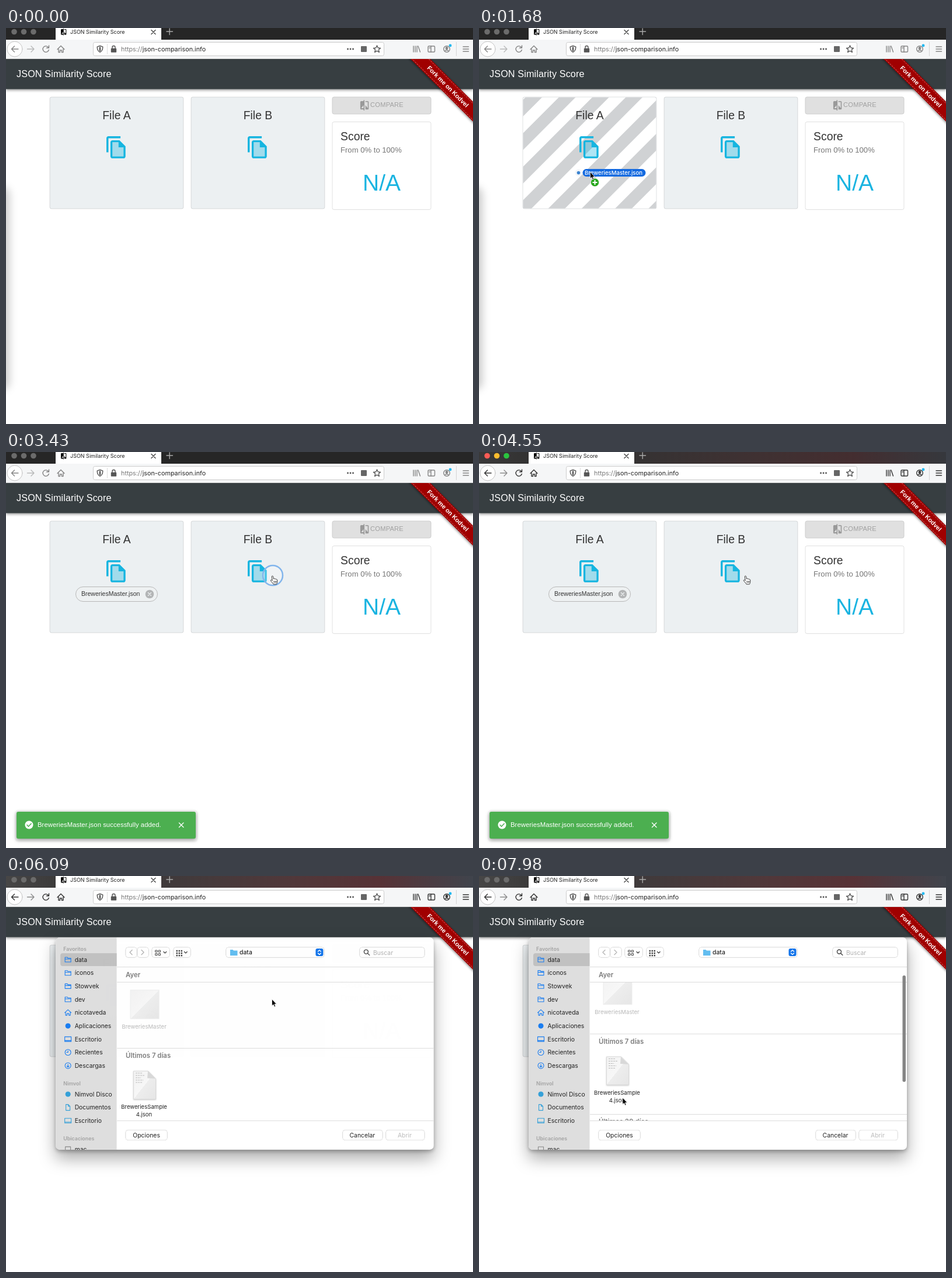
An HTML page that plays this animation: 800x677 px, repeating every 8 s.

```html
<!DOCTYPE html>
<html lang="en">
<head>
<meta charset="utf-8">
<title>JSON Similarity Score</title>
<style>
  html, body { margin: 0; height: 100%; overflow: hidden; background: #fff; }
  svg { display: block; width: 100vw; height: 100vh; }
  text { font-family: "Liberation Sans", Arial, sans-serif; fill: #333; }
  .ui text { font-family: Inter, sans-serif; font-size: 10.4px; fill: #222; }
  .mid { text-anchor: middle; }
  .line { fill: none; stroke: currentColor; stroke-width: 1.4; stroke-linecap: round; stroke-linejoin: round; }
  .side-icon { stroke-width: 1.1; }
  .solid { fill: currentColor; }
  .rule { stroke: #dcdcdc; fill: none; }
  .title { font-size: 19.4px; }
  .ui .group { font-size: 11.4px; font-weight: 600; fill: #7d7d7d; }
  .ui .side { font-size: 8.9px; font-weight: 600; fill: #a3a3a3; }
  .ui .file { font-size: 9.6px; text-anchor: middle; }
  .button { fill: #fff; stroke: #ececec; stroke-width: .8; filter: drop-shadow(0 .7px .6px #0006); }
  .card { stroke: #0000001f; }
  #dialog { filter: drop-shadow(0 3px 3px #0004) drop-shadow(0 14px 14px #0005); transform-origin: 409px 286px; }
  #snack { filter: drop-shadow(0 2px 3px #0006); transform-origin: 171px 638px; }
</style>
</head>
<body>
<svg viewBox="0 0 800 677" preserveAspectRatio="none">
  <defs>
    <linearGradient id="strip">
      <stop stop-color="#474646"/><stop offset=".12" stop-color="#3a3939"/>
      <stop offset=".35" stop-color="#403a3b"/><stop offset=".6" stop-color="#50383a"/>
      <stop offset=".8" stop-color="#573236"/><stop offset="1" stop-color="#40444c"/>
    </linearGradient>
    <linearGradient id="paper" x2="1" y2="1">
      <stop stop-color="#f2f2f2"/><stop offset=".5" stop-color="#f7f7f7"/><stop offset=".5" stop-color="#ededed"/><stop offset="1" stop-color="#e6e6e6"/>
    </linearGradient>
    <filter id="blur" x="-50%" width="200%"><feGaussianBlur stdDeviation="7"/></filter>
    <clipPath id="cardClip"><rect x="75.5" y="118.5" width="228" height="190" rx="3"/></clipPath>
    <clipPath id="sheetClip"><rect x="85" y="105" width="648" height="363" rx="7"/></clipPath>
    <clipPath id="listClip"><rect x="190" y="182" width="543" height="236"/></clipPath>
    <clipPath id="pageClip"><rect y="53" width="800" height="624"/></clipPath>
    <g id="copy" transform="scale(1.72)" fill="#16b5e0">
      <path opacity=".35" d="M14 7H8v14h11v-9h-5z"/>
      <path d="M16 1H4c-1.1 0-2 .9-2 2v14h2V3h12V1zm-1 4H8c-1.1 0-2 .9-2 2v14c0 1.1.9 2 2 2h11c1.1 0 2-.9 2-2V11l-6-6zm4 16H8V7h6v5h5v9z"/>
    </g>
    <path id="compare" d="M10 3H5c-1.1 0-2 .9-2 2v14c0 1.1.9 2 2 2h5v2h2V1h-2v2zm0 15H5l5-6v6zm9-15h-5v2h5v13l-5-6v9h5c1.1 0 2-.9 2-2V5c0-1.1-.9-2-2-2z"/>
    <path id="arrow" d="M0 0V11.5L2.6 9.2 4.3 13.2 6.2 12.3 4.5 8.6H8Z" stroke="#fff" stroke-width=".8"/>
    <path id="hand" d="M1.3 1.5C2.5.2 3.6 1 3.8 2.3L4.4 6C5 5 6.2 5.2 6.5 6.2 7.3 5.4 8.4 5.8 8.7 6.8 9.5 6.2 10.7 6.8 10.7 8V11C10.7 13 9.8 14 9.5 15H4C3 12.5 1 11.5-.5 9.3-1.3 8 .4 7.2 1.3 8.2L2.2 9Z M5 9.5V12.5M7 9.5V12.5M8.8 9.5V12.5" transform="translate(-2 -1)" fill="#fff" stroke="#222" stroke-width=".9" stroke-linejoin="round"/>
  </defs>

  <rect width="800" height="677" fill="#fff"/>
  <rect id="neighbour" x="-60" y="272" width="66" height="346" rx="12" fill="#0003" filter="url(#blur)"/>

  <!-- Page -->
  <g clip-path="url(#pageClip)">
    <rect y="53" width="800" height="51.5" fill="#373e41" style="filter:drop-shadow(0 2px 2px #0006)"/>
    <text x="18" y="83.5" font-size="16.2" letter-spacing=".12" style="fill:#fff">JSON Similarity Score</text>
    <g transform="translate(757 100) rotate(45)">
      <rect x="-110" y="-12" width="220" height="24" fill="#a00000" style="filter:drop-shadow(0 1px 2px #0008)"/>
      <path d="M-110-10H110M-110 10H110" stroke="#d99" stroke-width=".8" stroke-dasharray="2.5 2"/>
      <text class="mid" y="3.7" font-size="10.6" font-weight="700" style="fill:#fff">Fork me on Kodvel</text>
    </g>
  </g>
  <g fill="#ecf0f2">
    <rect class="card" x="75" y="118" width="229" height="191" rx="3"/>
    <rect class="card" x="317" y="118" width="229" height="191" rx="3"/>
  </g>
  <g id="stripes" clip-path="url(#cardClip)">
    <rect x="75" y="118" width="230" height="192" fill="#fff"/>
    <path id="bands" fill="#d0d2d4"/>
  </g>
  <g class="title mid">
    <text x="189.5" y="156">File A</text><text x="431.5" y="156">File B</text>
  </g>
  <use href="#copy" x="168.6" y="183.3"/>
  <use href="#copy" x="410.6" y="183.3"/>
  <rect x="559" y="118" width="169" height="29" rx="3" fill="#e0e0e0" stroke="#cdcdcd"/>
  <use href="#compare" transform="translate(604.5 122.5) scale(.8)" fill="#999"/>
  <text x="624" y="135.3" font-size="11.1" letter-spacing=".25" style="fill:#a0a0a0">COMPARE</text>
  <rect class="card" x="559" y="160.5" width="169" height="150" rx="3" fill="#fff"/>
  <text class="title" x="573" y="192">Score</text>
  <text x="573" y="213" font-size="13.1" style="fill:#777">From 0% to 100%</text>
  <text class="mid" x="643.5" y="278" font-size="39" style="fill:#1ab4e1">N/A</text>
  <g id="chip">
    <rect x="119.5" y="230.5" width="140" height="25" rx="12.5" fill="#eef1f2" stroke="#b8b8b8"/>
    <text x="129" y="246.3" font-size="10.5">BreweriesMaster.json</text>
    <circle cx="246" cy="243" r="7.3" fill="#b3b5b6"/>
    <path class="line" color="#eef1f2" d="M243.5 240.5l5 5m0-5l-5 5"/>
  </g>
  <g id="snack">
    <rect x="15" y="612" width="314" height="55" rx="6" fill="#0000000a"/>
    <rect x="18" y="615" width="307" height="46" rx="3" fill="#4caf50"/>
    <circle cx="39.5" cy="637.5" r="7" fill="#fff"/>
    <path class="line" color="#4caf50" d="M36 637.5l2.5 2.7 4.7-5"/>
    <text x="54" y="640.5" font-size="11.3" letter-spacing=".05" style="fill:#fff">BreweriesMaster.json successfully added.</text>
    <path class="line" color="#fff" d="M296.5 634l7.5 7.5m0-7.5l-7.5 7.5"/>
  </g>

  <!-- Browser frame -->
  <g class="ui">
    <rect width="800" height="20" fill="#262626"/>
    <rect id="tint" width="800" height="20" fill="url(#strip)"/>
    <g id="lights"></g>
    <rect x="85" width="181" height="20" fill="#fff"/>
    <use href="#compare" transform="translate(92.5 .5) scale(.52)"/>
    <text x="110" y="10" style="font-size:9px">JSON Similarity Score</text>
    <path class="line" color="#444" d="M249 3.5l7 7m0-7l-7 7"/>
    <path class="line" color="#aaa" d="M275 6h10.5M280.2 1v10.5"/>
    <rect y="20" width="800" height="33" fill="#f5f6f7"/>
    <path d="M0 52.5H800" stroke="#d8d8d8"/>
    <g id="icons" class="line">
      <circle cx="15" cy="36" r="13" fill="#fff" stroke="#c5c5c5" stroke-width="1"/>
      <path d="M21 36H9.5m5-5l-5 5 5 5"/>
      <path d="M36.5 36H48m-5-5l5 5-5 5" opacity=".55"/>
      <path d="M72.5 33a5.2 5.2 0 1 0 .8 4.5M73.5 30v4h-4"/>
      <path d="M88 36.5l6-6 6 6M90 36v5.5h2.5v-3.5h3v3.5H98V36"/>
      <path d="M698 31v10M701 31v10M704 31v10M706 31l3.5 10"/>
      <rect x="723" y="31" width="11.5" height="10" rx="1.5"/><path d="M728 31v10M725 34h1.5"/>
      <circle cx="755" cy="36" r="5.3"/><circle cx="755" cy="34.5" r="1.7" fill="currentColor"/><path d="M752 39q3-2.5 6 0"/>
      <path d="M783 32h9.5M783 36h9.5M783 40h9.5"/>
    </g>
    <circle cx="761" cy="30" r="2.4" fill="#20b8f0"/>
    <path d="M771.5 24v24" stroke="#d5d5d5"/>
    <rect x="149.5" y="24.5" width="498" height="23" rx="3" fill="#fff" stroke="#ccc"/>
    <path d="M173.5 27v18" stroke="#ddd"/>
    <g class="line" color="#555">
      <path d="M161 30.5l4.8 1.7c0 5-1.5 7.5-4.8 9.3-3.3-1.8-4.8-4.3-4.8-9.3z"/>
      <path d="M161 33.5v5" stroke-width="2.5"/>
      <rect x="180.5" y="35.5" width="8" height="5.5" fill="currentColor"/><path d="M182 35v-2a2.5 2.5 0 0 1 5 0v2"/>
      <path d="M585.5 36h.1M590 36h.1M594.5 36h.1" stroke-width="2.8"/>
      <path d="M635.5 30l1.8 4 4.2.4-3.2 2.8 1 4.3-3.8-2.3-3.8 2.3 1-4.3-3.2-2.8 4.2-.4z"/>
    </g>
    <rect x="608" y="31" width="10" height="10" rx="1" fill="#666"/>
    <text x="197" y="40.3" style="font-size:10.8px"><tspan fill="#777">https://</tspan>json-comparison.info</text>
  </g>

  <!-- File dialog -->
  <g id="dialog" class="ui"><g clip-path="url(#sheetClip)">
    <rect x="85" y="105" width="648" height="363" fill="#fff"/>
    <rect x="85" y="105" width="104.5" height="363" fill="#dedede"/>
    <path d="M189.5 132H97q-4 0-4 4v14q0 4 4 4h92.5z" fill="#c1c1c1"/>
    <g id="sidebar"></g>
    <g clip-path="url(#listClip)"><g id="files">
      <rect x="213" y="195" width="49" height="49" fill="url(#paper)" stroke="#ececec"/>
      <text class="file" x="236.5" y="260.8" style="fill:#b8b8b8">BreweriesMaster</text>
      <path class="rule" d="M190 294.5h543M190 432h543"/>
      <text class="group" x="205" y="311">Últimos 7 días</text>
      <path d="M218.500 333.5h25l13 13v35h-38z" fill="url(#paper)" stroke="#d9d9d9" style="filter:drop-shadow(0 1px 1px #0003)"/>
      <path d="M243 333.5l-1 12 14 1z" fill="#d8d8d8"/>
      <path d="M222 337h11M222 341h15M222 345h9M222 349h13M222 353h11" stroke="#bbb" stroke-dasharray="3 1"/>
      <text class="file" x="236.5" y="398.3">BreweriesSample</text>
      <text class="file" x="236.5" y="411.3">4.json</text>
      <text class="group" x="205" y="448">Últimos 30 días</text>
    </g></g>
    <path class="rule" d="M190 155.5h543M190 181.5h543M190 418.5h543"/>
    <text class="group" x="205" y="173.3">Ayer</text>
    <g id="buttons"></g>
    <path class="line" color="#b5b5b5" d="M216 126.5l-4 4 4 4M232 126.5l4 4-4 4"/>
    <g class="line" color="#444">
      <path d="M256 127h3v3h-3zm5.5 0h3v3h-3zm-5.500 5.5h3v3h-3zm5.500 0h3v3h-3z" stroke-width="1"/>
      <path d="M270 129.5l2.3 2.3 2.3-2.3M305.5 129.5l2.3 2.3 2.3-2.3"/>
      <path d="M291.5 128h10.500M291.5 132h10.500M291.5 136h10.500" stroke-width="2.5" stroke-dasharray="2.5 1.5" stroke-linecap="butt" style="stroke-linecap:butt"/>
      <circle cx="617" cy="129.5" r="3.5"/><path d="M619.8 132.3l3 3"/>
    </g>
    <path d="M384 126h4.5l1.5 1.5h6.5V136H384z" fill="#62bdf0"/>
    <text x="400" y="134.3" style="font-weight:500">data</text>
    <rect x="530.5" y="124" width="13" height="13" rx="3" fill="#1475ea"/>
    <path class="line" color="#fff" d="M534.5 129l2.5-2.3 2.5 2.3M534.5 132l2.5 2.3 2.5-2.3"/>
    <text x="629" y="134.5" style="fill:#b0b0b0">Buscar</text>
    <g class="mid">
      <text x="240.5" y="447">Opciones</text><text x="610.5" y="447">Cancelar</text>
      <text x="683" y="447" style="fill:#bbb">Abrir</text>
    </g>
    <rect id="scrollbar" x="725.5" y="170" width="5.5" height="182" rx="2.7" fill="#858585"/>
  </g></g>

  <circle id="ring" cx="457" cy="211" r="17" fill="#ffffff33" stroke="#82b5ec" stroke-width="2.5"/>
  <g id="pointer">
    <g id="drag" class="ui">
      <circle cx="-20" cy="1.5" r="6" fill="#f2f5f8"/><circle cx="-20" cy="1.5" r="2.8" fill="#3b83d0"/>
      <rect x="-13" y="-5" width="108" height="13" rx="6.5" fill="#146ae0"/>
      <text x="-9.5" y="4.8" style="font-size:9.6px;font-weight:500;fill:#fff">BreweriesMaster.json</text>
      <circle cx="8" cy="18" r="7" fill="#26a61c" stroke="#e9f5e7" stroke-width=".8"/>
      <path d="M4 18h8M8 14v8" stroke="#fff" stroke-width="2"/>
    </g>
    <use id="arrowUse" href="#arrow"/><use id="handUse" href="#hand"/>
  </g>
</svg>
<script>
const LOOP = 8000, DROP = 1890, ACTIVE = 3500, LEAVE = 5250, OPEN = 5880;
const $ = id => document.getElementById(id);
const clamp = v => Math.max(0, Math.min(1, v));
const ease = v => v * v * (3 - 2 * v);
const ramp = (t, from, to) => ease(clamp((t - from) / (to - from)));
const show = (id, alpha) => $(id).setAttribute('opacity', Number(alpha));
const move = (id, x, y) => $(id).setAttribute('transform', `translate(${x} ${y})`);

// Pointer tip: time, x, y
const path = [
  [770, -100, 335], [1540, 184, 249], [1680, 190.5, 246], [1850, 192, 245.5],
  [2520, 192, 245.5], [3290, 456, 212], [5250, 456, 212], [5300, 455.5, 210.5],
  [6090, 455.5, 210.5], [6860, 265.5, 299.5], [6950, 265.5, 299.5], [7600, 246, 379]
];
function pointerAt(t) {
  const next = path.findIndex(p => p[0] > t);
  if (next === 0) return path[0].slice(1);
  if (next < 0) return path.at(-1).slice(1);
  const [a, b] = [path[next - 1], path[next]];
  const k = ramp(t, a[0], b[0]);
  return [a[1] + (b[1] - a[1]) * k, a[2] + (b[2] - a[2]) * k];
}

const glyphs = {
  folder: 'M-5-4h4l1 1.5h5v6.5h-10zM-5-1h10',
  home: 'M-5.5 0L0-5 5.5 0M-4-1v5.5h2.5v-3h3v3H4V-1',
  screen: 'M-5.5-4h11v8h-11zM-5 2.5h10',
  clock: 'M-5 0a5 5 0 1 0 10 0a5 5 0 1 0-10 0M0-3V0H-2.5',
  down: 'M-5 0a5 5 0 1 0 10 0a5 5 0 1 0-10 0M0-2.5V2.5M-2 .7L0 2.7 2 .7',
  page: 'M-3.5-5h4l3 3v7h-7zM.5-5v3h3',
  box: 'M-4.5-4h9v7h-9z',
  dot: 'M-4 0a4 4 0 1 0 8 0a4 4 0 1 0-8 0'
};
const row = (y, icon, label, color) =>
  `<path class="line side-icon ${icon === 'dot' ? 'solid' : ''}" color="${color}" transform="translate(106 ${y})" d="${glyphs[icon]}"/>` +
  `<text x="117.5" y="${y + 3.8}">${label}</text>`;
const section = (y, title, first, color, rows) =>
  `<text class="side" x="98" y="${y}">${title}</text>` +
  rows.map(([icon, label], i) => row(first + i * 22.65, icon, label, color)).join('');
$('sidebar').innerHTML =
  section(128, 'Favoritos', 143, '#1a7df0', [
    ['folder', 'data'], ['folder', 'íconos'], ['folder', 'Stowvek'], ['folder', 'dev'],
    ['home', 'nicotaveda'], ['dot', 'Aplicaciones'], ['screen', 'Escritorio'],
    ['clock', 'Recientes'], ['down', 'Descargas']]) +
  section(358, 'Nimvol', 373, '#35a0d8', [
    ['dot', 'Nimvol Disco'], ['page', 'Documentos'], ['screen', 'Escritorio']]) +
  section(452, 'Ubicaciones', 467, '#888', [['box', 'mac']]);

const button = (x, y, w) => `<rect class="button" x="${x}" y="${y}" width="${w}" height="17" rx="4"/>`;
$('buttons').innerHTML =
  [[205, 19], [225, 19], [250, 30], [287, 29], [377, 168], [606, 111]].map(([x, w]) => button(x, 122, w)).join('') +
  [[205, 71], [577, 68], [651, 66]].map(([x, w]) => button(x, 434.5, w)).join('');

const lightColors = ['#fc5b55', '#fdbc2e', '#2ac43f'];
$('lights').innerHTML = [14, 30.5, 47].map(x => `<circle cx="${x}" cy="6.5" r="4.8"/>`).join('');

// Diagonal bands sliding left, one period every two seconds
function bandPath(t) {
  const period = 57.3, first = 80 - (t - 1680) * period / 2000;
  let d = '';
  for (let i = -1; i < 9; i++) {
    d += `M${first + i * period} 118h${period / 2}l-192 192h${-period / 2}z`;
  }
  return d;
}

function draw(t) {
  const [x, y] = pointerAt(t);
  const dragging = t < DROP, focused = t >= ACTIVE && t < OPEN;
  const overCard = (x > 75 && x < 304) || (x > 317 && x < 546);
  const hand = !dragging && t < LEAVE && overCard;

  show('neighbour', dragging);
  show('stripes', dragging && x > 75);
  $('bands').setAttribute('d', bandPath(t));
  show('chip', !dragging);

  const snack = ramp(t, DROP, DROP + 225) * (1 - ramp(t, LEAVE, LEAVE + 195));
  show('snack', snack);
  $('snack').style.transform = `scale(${0.75 + 0.25 * snack})`;

  show('tint', t >= LEAVE ? 1 : focused ? 0.6 : 0);
  [...$('lights').children].forEach((c, i) => c.setAttribute('fill', focused ? lightColors[i] : '#6b6b6b'));
  $('icons').setAttribute('color', t >= ACTIVE ? '#333' : '#858585');

  const open = ramp(t, OPEN, OPEN + 220);
  show('dialog', open);
  $('dialog').style.transform = `scale(${0.9 + 0.1 * open})`;
  move('files', 0, -24.5 * ramp(t, 7450, 7900));
  show('scrollbar', ramp(t, 7400, 7500));

  const press = (t >= 3360 && t < 3640) || (t >= 4200 && t < 4410);
  show('ring', press);
  move('pointer', x, y);
  show('drag', dragging);
  show('arrowUse', !hand);
  show('handUse', hand);
}

const start = performance.now();
function tick() {
  draw((performance.now() - start) % LOOP);
  requestAnimationFrame(tick);
}
tick();
</script>
</body>
</html>
```
